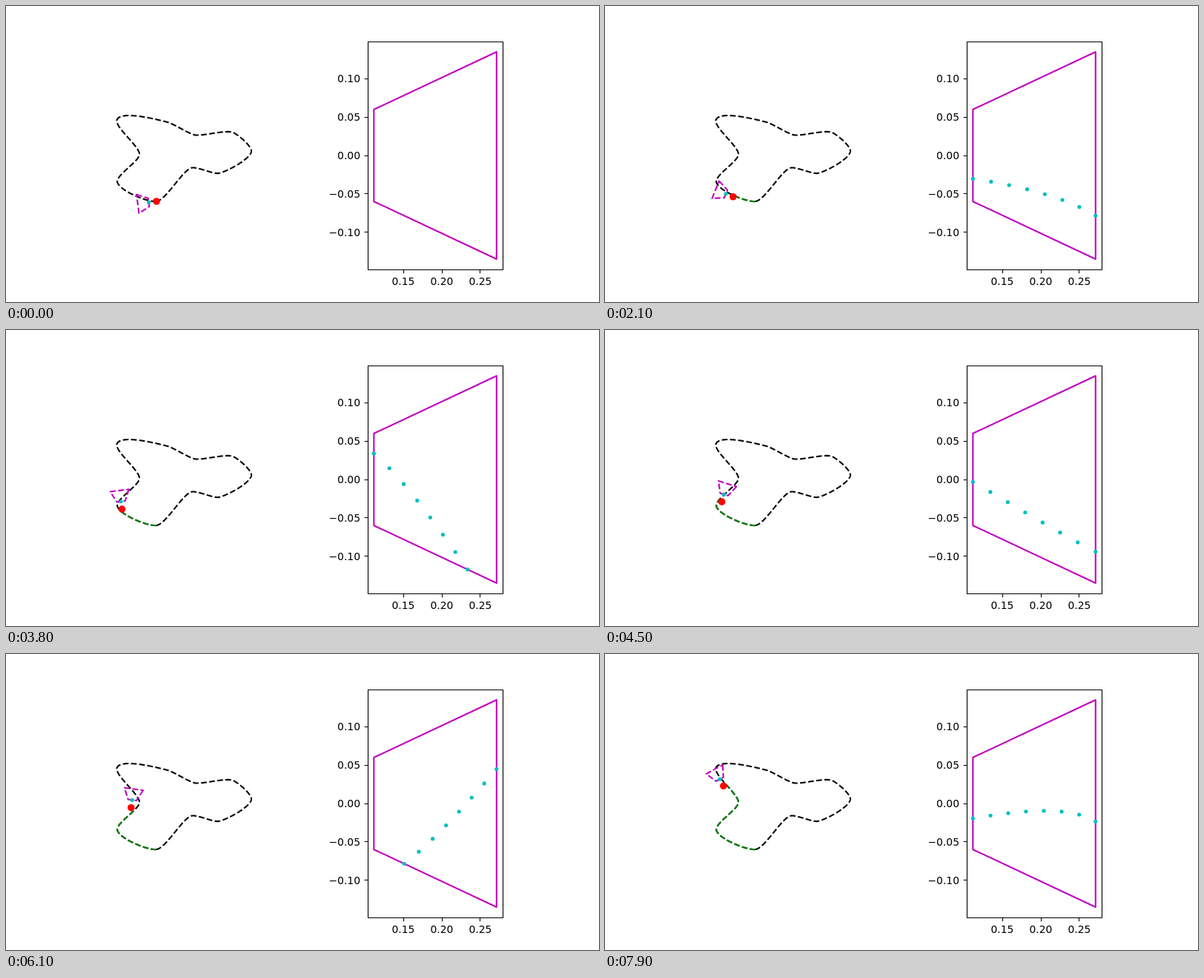
Recreate the animation shown at these times as an HTML page. Size 800 by 400 pixels, loop 8 s.

```html
<!DOCTYPE html>
<html lang="en">
<head>
<meta charset="utf-8">
<title>Track follower</title>
<style>
  html, body { margin: 0; width: 100%; height: 100%; overflow: hidden; background: #fff; }
  svg { display: block; width: 800px; height: 400px; }
  path { fill: none; stroke-width: 2.08; stroke-linejoin: round; }
  .dash { stroke-dasharray: 7.71 3.33; }
  .axis { stroke: #000; stroke-width: 1.11; stroke-linejoin: miter; }
  text { font: 13.89px "DejaVu Sans", sans-serif; }
</style>
</head>
<body>
<svg id="stage" viewBox="0 0 800 400" xmlns="http://www.w3.org/2000/svg"></svg>
<script>
const stage = document.getElementById('stage');
const FRAME_MS = 100, FRAMES = 80, DOTS = 8;
const MAP_SCALE = 93.9;                              // map pixels per unit
const VIEW = { scale: 1037, x0: 380.7, y0: 202 };    // camera plot
const CAM = { near: 0.1115, far: 0.2711, nearHalf: 0.06, farHalf: 0.135 };
const DRIVE = { speed: 1.95, turnGain: 0.084, rampFrames: 8 };

// Corners of the closed track, starting where the robot starts
const CORNERS = [
  [203, 264], [150.2, 237.8], [180, 200.5], [150.2, 152.8], [218, 157],
  [255, 174.3], [306, 170.8], [331, 196.5], [287, 226], [250, 218.8]
];
const CORNER_SHARE = 0.516;   // part of each turn made before the corner point
const HANDLE = 0.2;           // Bezier handle length per corner distance
const STEPS = 200;

function add(tag, attrs, text) {
  const node = document.createElementNS(stage.namespaceURI, tag);
  for (const key in attrs) node.setAttribute(key, attrs[key]);
  if (text) node.textContent = text;
  return stage.appendChild(node);
}

const pathOf = (pts, closed) =>
  'M' + pts.map(p => p[0].toFixed(2) + ' ' + p[1].toFixed(2)).join('L') + (closed ? 'Z' : '');

const mix = (a, b, u) => [a[0] + (b[0] - a[0]) * u, a[1] + (b[1] - a[1]) * u];
const distance = (a, b) => Math.hypot(b[0] - a[0], b[1] - a[1]);
const direction = (a, b) => Math.atan2(b[1] - a[1], b[0] - a[0]);
const ahead = (p, angle, d) => [p[0] + d * Math.cos(angle), p[1] + d * Math.sin(angle)];

const corner = i => CORNERS[(i + CORNERS.length) % CORNERS.length];

function tangent(i) {
  const into = direction(corner(i - 1), corner(i));
  const turn = direction(corner(i), corner(i + 1)) - into;
  return into + CORNER_SHARE * Math.atan2(Math.sin(turn), Math.cos(turn));
}

function buildTrack() {
  return CORNERS.flatMap((a, i) => {
    const b = corner(i + 1), reach = HANDLE * distance(a, b);
    const p = ahead(a, tangent(i), reach), q = ahead(b, tangent(i + 1), -reach);
    return Array.from({ length: STEPS }, (_, s) => {
      const u = s / STEPS, m = mix(p, q, u);
      return mix(mix(mix(a, p, u), m, u), mix(m, mix(q, b, u), u), u);
    });
  });
}

// Local coordinates are [forward, right] in units
function toMap({ pos, angle }, [f, r]) {
  return ahead(ahead(pos, angle, f * MAP_SCALE), angle + Math.PI / 2, r * MAP_SCALE);
}
function toLocal({ pos, angle }, p) {
  const d = distance(pos, p) / MAP_SCALE, bearing = direction(pos, p) - angle;
  return [d * Math.cos(bearing), d * Math.sin(bearing)];
}
const toView = ([f, r]) => [VIEW.x0 + f * VIEW.scale, VIEW.y0 + r * VIEW.scale];

// Positive inside the camera trapezoid
function depth([f, r]) {
  const half = CAM.nearHalf
    + (CAM.farHalf - CAM.nearHalf) * (f - CAM.near) / (CAM.far - CAM.near);
  return Math.min(f - CAM.near, CAM.far - f, half - Math.abs(r));
}

function visibleTrack(pose) {
  const run = [];
  let prev = toLocal(pose, track[pose.index]), dPrev = depth(prev);
  for (let i = pose.index + 1; i < track.length; i++) {
    const p = toLocal(pose, track[i]), d = depth(p);
    if ((d > 0) !== (dPrev > 0)) run.push(mix(prev, p, dPrev / (dPrev - d)));
    if (d > 0) run.push(p);
    else if (run.length) break;
    prev = p;
    dPrev = d;
  }
  return run;
}

function resample(pts, count) {
  const sums = [0];
  for (let i = 1; i < pts.length; i++) sums.push(sums[i - 1] + distance(pts[i - 1], pts[i]));
  const total = sums[sums.length - 1], out = [];
  for (let k = 0, i = 1; k < count; k++) {
    const goal = total * k / (count - 1);
    while (i < pts.length - 1 && sums[i] < goal) i++;
    out.push(mix(pts[i - 1], pts[i], (goal - sums[i - 1]) / (sums[i] - sums[i - 1] || 1)));
  }
  return out;
}

// Nearest track point, searched a little way on from the last one
function advance(index, pos) {
  let best = index;
  for (let i = index; i < index + STEPS / 4; i++) {
    if (distance(track[i], pos) < distance(track[best], pos)) best = i;
  }
  return best;
}

// The robot steers by the angle of the line it sees and slows in turns
function drive() {
  const poses = [];
  let pose = { pos: CORNERS[0], angle: tangent(0), index: 0 };
  for (let frame = 0; frame < FRAMES; frame++) {
    const seen = visibleTrack(pose);
    const error = seen.length > 1 ? direction(seen[0], seen[seen.length - 1]) : 0;
    // The camera has no reading yet on the first frame
    pose.dots = frame > 0 && seen.length > 1 ? resample(seen, DOTS) : [];
    poses.push(pose);

    const ramp = Math.min(1, frame / DRIVE.rampFrames);
    const angle = pose.angle + DRIVE.turnGain * error;
    const pos = ahead(pose.pos, (pose.angle + angle) / 2, DRIVE.speed * ramp * Math.cos(error));
    pose = { pos, angle, index: advance(pose.index, pos) };
  }
  return poses;
}

function drawAxes() {
  add('path', { class: 'axis', d: 'M488.5 48.5H670.5V356.5H488.5Z' });
  for (const v of [0.15, 0.2, 0.25]) {
    const x = VIEW.x0 + v * VIEW.scale;
    add('path', { class: 'axis', d: `M${Math.floor(x) + 0.5} 356.5v4.86` });
    add('text', { x: Math.round(x), y: 377, 'text-anchor': 'middle' }, v.toFixed(2));
  }
  for (const v of [0.1, 0.05, 0, -0.05, -0.1]) {
    const y = VIEW.y0 - v * VIEW.scale;
    add('path', { class: 'axis', d: `M488.5 ${Math.floor(y) + 0.5}h-4.86` });
    add('text', { x: 478, y: Math.round(y + 5), 'text-anchor': 'end' },
      (v < 0 ? '\u2212' : '') + Math.abs(v).toFixed(2));
  }
}

const track = buildTrack();
const poses = drive();
const frustum = [
  [CAM.far, CAM.farHalf], [CAM.near, CAM.nearHalf],
  [CAM.near, -CAM.nearHalf], [CAM.far, -CAM.farHalf]
];

add('path', { class: 'dash', stroke: '#000', d: pathOf(track, true) });
const trail = add('path', { class: 'dash', stroke: '#008000' });
const cone = add('path', { class: 'dash', stroke: '#bf00bf' });
const sensor = add('circle', { r: 2.6, fill: '#00bfbf' });
const robot = add('circle', { r: 4.8, fill: '#f00' });
add('path', { stroke: '#bf00bf', d: pathOf(frustum.map(toView), true) });
const dots = Array.from({ length: DOTS }, () => add('circle', { r: 2.6, fill: '#00bfbf' }));
drawAxes();

function place(circle, [x, y]) {
  circle.setAttribute('cx', x.toFixed(2));
  circle.setAttribute('cy', y.toFixed(2));
}

function render(pose) {
  trail.setAttribute('d', pathOf(track.slice(0, pose.index + 1)));
  cone.setAttribute('d', pathOf(frustum.map(p => toMap(pose, p)), true));
  place(sensor, toMap(pose, [CAM.near, 0]));
  place(robot, pose.pos);
  dots.forEach((dot, i) => {
    const sample = pose.dots[i];
    dot.setAttribute('visibility', sample ? 'visible' : 'hidden');
    if (sample) place(dot, toView(sample));
  });
}

const start = performance.now();
function tick() {
  render(poses[Math.floor((performance.now() - start) / FRAME_MS) % FRAMES]);
  requestAnimationFrame(tick);
}
tick();
</script>
</body>
</html>
```
